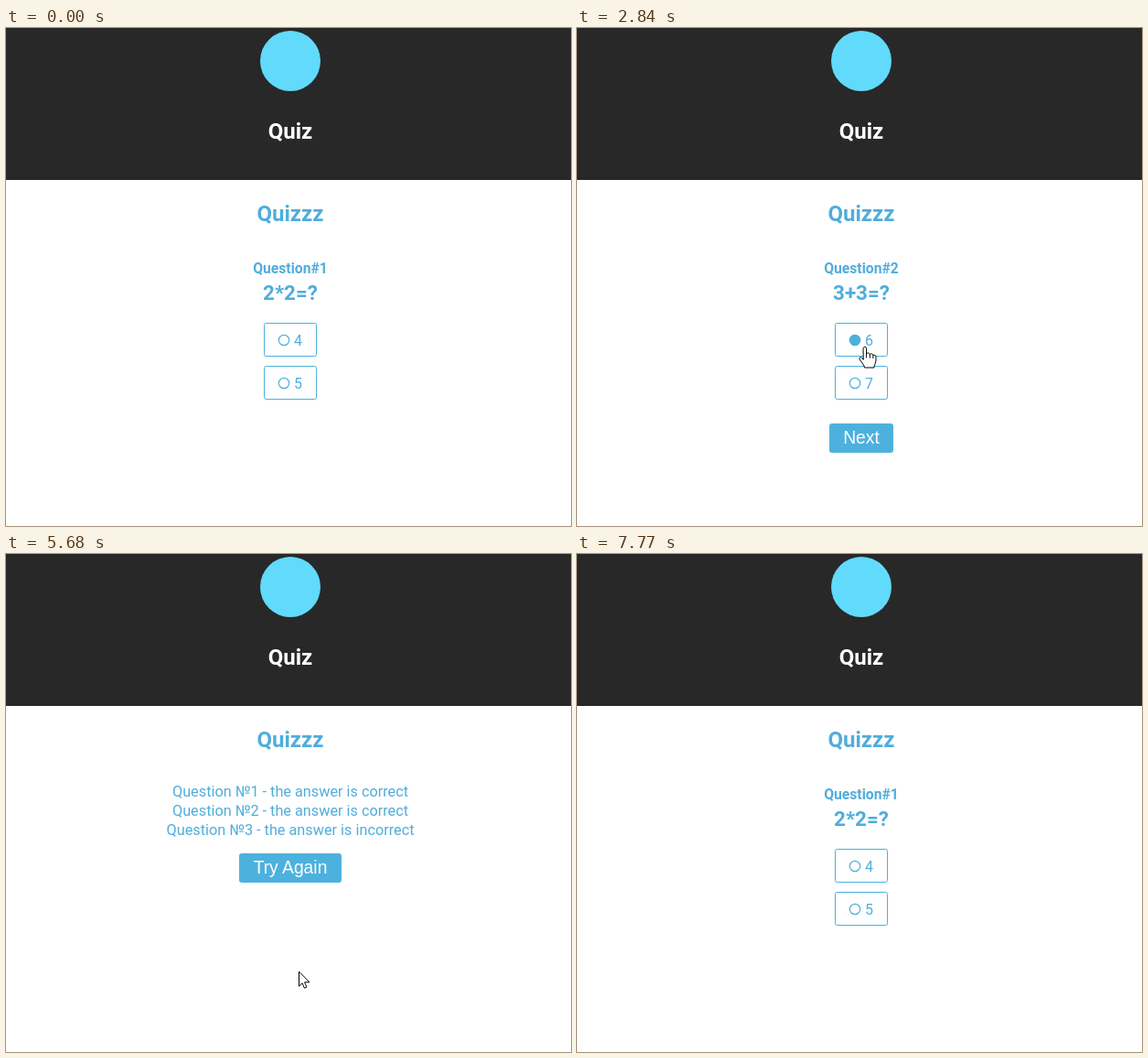
Animation of 618 by 544 pixels, one loop 7840 ms. Source, as an HTML page:

```html
<!DOCTYPE html>
<html lang="en">
<head>
<meta charset="utf-8">
<title>Quiz</title>
<style>
  html, body { margin: 0; width: 100%; height: 100%; overflow: hidden; background: #fff; }
  svg { display: block; width: 618px; height: 544px; }
  text { font-family: Roboto, sans-serif; font-size: 16px; fill: #50addb; }
  .mid { text-anchor: middle; }
  .bold { font-weight: 700; }
  .title { font-size: 24px; }
  .heading { font-size: 15.7px; }
  .question { font-size: 22.4px; }
  .result { font-size: 16.25px; }
  .option rect { fill: #fff; stroke: #4db1de; }
  .option circle { stroke: #4db1de; stroke-width: 1.2; }
  .button rect { fill: #4db1de; }
  .button text { font-family: "Liberation Sans", Arial, sans-serif; font-size: 19.3px; fill: #fff; }
  #cursor path { fill: #fff; stroke: #000; stroke-linejoin: round; stroke-linecap: round; }
</style>
</head>
<body>
<svg viewBox="0 0 618 544">
  <rect width="618" height="166" fill="#282828"/>
  <circle cx="311" cy="36" r="33" fill="#61dafb"/>
  <text class="mid bold title" x="311" y="121" style="fill:#fff">Quiz</text>
  <text class="mid bold title" x="311" y="211">Quizzz</text>

  <g id="quiz">
    <text id="heading" class="mid bold heading" x="311" y="268"></text>
    <text id="question" class="mid bold question" x="311" y="297"></text>
    <g class="option">
      <rect x="282.5" y="322.5" width="57" height="36" rx="2"/>
      <circle cx="304" cy="341" r="5.7"/>
      <text x="315" y="347"></text>
    </g>
    <g class="option">
      <rect x="282.5" y="369.5" width="57" height="36" rx="2"/>
      <circle cx="304" cy="388" r="5.7"/>
      <text x="315" y="394"></text>
    </g>
  </g>

  <g id="results">
    <text class="mid result" x="311" y="265">Question №1 - the answer is correct</text>
    <text class="mid result" x="311" y="286">Question №2 - the answer is correct</text>
    <text class="mid result" x="311" y="307">Question №3 - the answer is incorrect</text>
  </g>

  <g id="button" class="button">
    <rect height="32" rx="3"/>
    <text class="mid" x="311"></text>
  </g>

  <g id="cursor">
    <path id="arrow" d="M.5 .5V16.2L4.1 12.8L6.4 18.2L8.9 17.1L6.6 11.8H11.6Z"/>
    <g id="hand">
      <path d="M-2 2C-2 -.2 1.6 -.2 1.6 2V8C2 6.3 5.2 6.6 5.3 8.6C6 7.2 8.8 7.7 8.9 9.6C9.8 8.6 12 9.2 12 11.2V15C12 18 10 19.5 10 23H-.5C-.5 20.5 -3 18.5 -5.8 14C-7 12 -4.7 10.8 -3.3 12.3L-2 14Z"/>
      <path d="M1.6 8V12M5.3 8.6V12.2M8.9 9.6V12.6" style="fill:none"/>
    </g>
  </g>
</svg>
<script>
const LOOP = 7840;
const $ = id => document.getElementById(id);
const show = (el, on) => el.style.display = on ? "" : "none";

const questions = [
  { text: "2*2=?", answers: [4, 5] },
  { text: "3+3=?", answers: [6, 7] },
  { text: "4+4=?", answers: [8, 9] }
];
const next = { label: "Next", x: 276, y: 432, width: 70 };
const results = { label: "Results", x: 264, y: 432, width: 94 };
const again = { label: "Try Again", x: 255, y: 327, width: 112 };

// Each click opens a new screen; one without a question is the results list.
const screens = [
  { at: 0, question: 0 },
  { at: 1200, question: 0, picked: 0, button: next },
  { at: 1800, question: 1 },
  { at: 2680, question: 1, picked: 0, button: next },
  { at: 3500, question: 2 },
  { at: 4380, question: 2, picked: 1, button: results },
  { at: 5200, button: again },
  { at: 6500, question: 0 }
];

// Cursor stops: time, x, y
const stops = [
  [70, 507, 535], [480, 357, 372], [570, 355, 370], [830, 326, 334],
  [980, 326, 332], [1220, 326, 332], [1580, 318, 449], [1860, 318, 449],
  [2400, 315, 348], [2880, 315, 348], [3250, 312, 444], [3560, 312, 445],
  [4150, 320, 393], [4640, 320, 393], [5000, 320, 455], [5950, 320, 456],
  [6350, 320, 344], [6750, 320, 344], [7080, 320, 408], [7250, 321, 425],
  [7640, 353, 545]
];

function cursorAt(t) {
  const i = stops.findIndex(s => s[0] > t);
  if (i < 1) return null;
  const [t0, x0, y0] = stops[i - 1], [t1, x1, y1] = stops[i];
  const p = (t - t0) / (t1 - t0), k = p * p * (3 - 2 * p);
  return { x: Math.round(x0 + (x1 - x0) * k), y: Math.round(y0 + (y1 - y0) * k) };
}

const inside = (p, x, y, w, h) => p.x >= x && p.x <= x + w && p.y >= y && p.y <= y + h;

function isClickable(p, { question, button }) {
  if (button && inside(p, button.x, button.y, button.width, 32)) return true;
  return question !== undefined && [322, 369].some(y => inside(p, 282, y, 58, 37));
}

const options = [...document.querySelectorAll(".option")];
const [buttonBox, buttonLabel] = $("button").children;

function drawScreen({ question, picked, button }) {
  const asking = question !== undefined;
  show($("quiz"), asking);
  show($("results"), !asking);
  show($("button"), button);
  if (asking) {
    const { text, answers } = questions[question];
    $("heading").textContent = "Question#" + (question + 1);
    $("question").textContent = text;
    options.forEach((option, i) => {
      const [, dot, label] = option.children;
      dot.setAttribute("fill", i === picked ? "#4db1de" : "#fff");
      label.textContent = answers[i];
    });
  }
  if (button) {
    buttonBox.setAttribute("x", button.x);
    buttonBox.setAttribute("y", button.y);
    buttonBox.setAttribute("width", button.width);
    buttonLabel.setAttribute("y", button.y + 22);
    buttonLabel.textContent = button.label;
  }
}

function drawCursor(p, screen) {
  show($("cursor"), p);
  if (!p) return;
  const pointing = isClickable(p, screen);
  show($("hand"), pointing);
  show($("arrow"), !pointing);
  $("cursor").setAttribute("transform", `translate(${p.x} ${p.y})`);
}

let start, current;
function update(now) {
  start ??= now;
  const t = Math.max(0, now - start) % LOOP;
  const screen = screens.filter(s => s.at <= t).pop();
  if (screen !== current) drawScreen(current = screen);
  drawCursor(cursorAt(t), screen);
  requestAnimationFrame(update);
}
update(performance.now());
</script>
</body>
</html>
```
